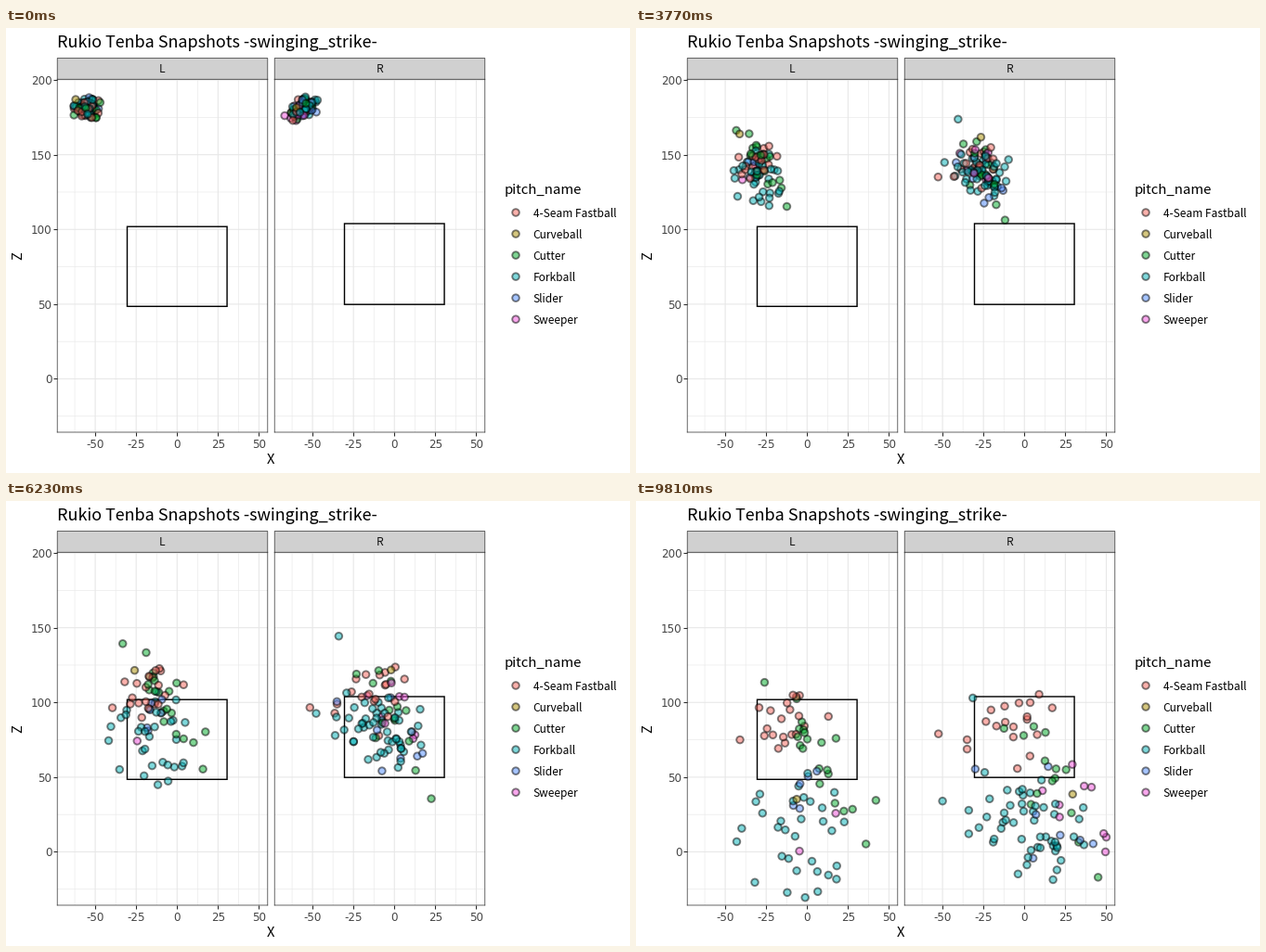
Animation, 672 px wide and 480 px high, one loop 10000 ms. Source, as a matplotlib script:

```python
import numpy as np
import matplotlib.pyplot as plt
from matplotlib.animation import FuncAnimation
from matplotlib.colors import to_rgba
from matplotlib.patches import Rectangle

W, H, DPI = 672, 480, 96
FRAMES, LOOP = 53, 10000
PX = 72 / DPI  # points per pixel
SANS, DIGITS = "Noto Sans CJK JP", "DejaVu Sans"
DARK, GRID, STRIP, TICK = "#2A2A2A", "#E7E7E7", "#D0D0D0", "#444444"
TOP, BOTTOM, WIDTH = 55.3, 436, 226.6
plt.rcParams["path.snap"] = False

# colour, flight time in steps, half acceleration (x, z),
# spread at the plate (x, z), correlation of x and z there
PITCHES = {
    "4-Seam Fastball": ("#F7645A", 39.5, (-0.0125, -0.023), (13, 16), 0.1),
    "Curveball": ("#AA8F00", 52.0, (0, -0.055), (0, 0), 0),
    "Cutter": ("#00AD28", 42.8, (0.002, -0.035), (16, 27), -0.8),
    "Forkball": ("#00B3B9", 45.2, (-0.010, -0.050), (18, 23), -0.2),
    "Slider": ("#4E8CFF", 43.8, (0, -0.040), (18, 20), -0.5),
    "Sweeper": ("#F351DD", 46.0, (0.015, -0.050), (12, 16), -0.4),
}
NAMES = list(PITCHES)

# pitch: (count, mean end point, outlying end points)
LEFT = {
    "4-Seam Fastball": (19, (-13, 87), [(-41, 75)]),
    "Curveball": (1, (-5, 28), []),
    "Cutter": (20, (6, 62), [(42, 34.5)]),
    "Forkball": (32, (-7, 16), []),
    "Slider": (5, (6, 37), []),
    "Sweeper": (2, (8, 20), []),
}
RIGHT = {
    "4-Seam Fastball": (18, (-9, 86), [(-52.5, 79)]),
    "Curveball": (1, (31.5, 32), []),
    "Cutter": (13, (19, 44), [(45, -17)]),
    "Forkball": (50, (2, 19), [(-31.5, 103), (-50, 34)]),
    "Slider": (7, (6, 30), []),
    "Sweeper": (8, (26, 38), [(49.5, 0)]),
}
rng = np.random.default_rng(34)


def cloud(n, mean, spread, corr):
    """Correlated points around a mean, cut off at two deviations."""
    a, b = rng.normal(size=(2, n)).clip(-2, 2)
    b = corr * a + np.sqrt(1 - corr**2) * b
    return np.array(mean) + np.c_[a, b] * spread


def throw(groups, tilt, sweep_shift):
    """Release, velocity, acceleration, flight time and type per pitch."""
    parts = []
    for kind, name in enumerate(NAMES):
        _, time, acc, spread, corr = PITCHES[name]
        n, mean, extra = groups[name]
        end = np.vstack([cloud(n, mean, spread, corr), *extra])
        n = len(end)
        shift = sweep_shift if name == "Sweeper" else 0
        start = cloud(n, (-55 + shift, 182 + shift), (4, 3.6), tilt)
        t = time + rng.normal(0, 0.5, (n, 1)).clip(-1, 1)
        acc = np.tile(acc, (n, 1))
        vel = (end - start - acc * t**2) / t
        parts.append((start, vel, acc, t, np.full(n, kind)))
    cols = [np.concatenate(c) for c in zip(*parts)]
    order = rng.permutation(len(cols[0]))
    return [c[order] for c in cols]


fig = plt.figure(figsize=(W / DPI, H / DPI), dpi=DPI, facecolor="white")
stage = fig.add_axes([0, 0, 1, 1])
stage.set(xlim=(0, W), ylim=(H, 0))
stage.axis("off")


def label(x, y, text, px, color="black", **kw):
    stage.text(x, y, text, fontsize=px * PX, color=color, family=SANS, **kw)


def dots(ax, xy, kinds):
    fills = [to_rgba(PITCHES[NAMES[k]][0], 0.5) for k in kinds]
    return ax.scatter(*np.transpose(xy), s=(7.58 * PX) ** 2, c=fills,
                      edgecolors=[(0, 0, 0, 0.5)], linewidths=1.89 * PX,
                      zorder=5)


def panel(x0, title, zone, data):
    ax = fig.add_axes([x0 / W, 1 - BOTTOM / H, WIDTH / W, (BOTTOM - TOP) / H])
    ax.set(xlim=(-73.2, 55.3), ylim=(-35.7, 200.5))
    ax.set_axisbelow(True)
    xs, zs = range(-50, 51, 25), range(0, 201, 50)
    ax.set_xticks(xs, [str(v) for v in xs])
    ax.set_yticks(zs, [str(v) for v in zs])
    ax.set_xticks(np.arange(-62.5, 55, 25), minor=True)
    ax.set_yticks(range(-25, 200, 50), minor=True)
    ax.grid(which="major", color=GRID, lw=1.07 * PX)
    ax.grid(which="minor", color=GRID, lw=0.6 * PX)
    ax.tick_params(which="minor", length=0)
    ax.tick_params(which="major", length=2.75, width=1.07 * PX, color=DARK,
                   labelcolor=TICK, labelsize=8.9, labelfontfamily=DIGITS)
    ax.tick_params(axis="x", pad=2.2)
    ax.tick_params(axis="y", pad=1.7)
    if title == "R":
        ax.tick_params(axis="y", length=0, labelleft=False)
    for spine in ax.spines.values():
        spine.set(color=DARK, linewidth=0.7 * PX)
    low, high = zone
    ax.add_patch(Rectangle((-30.5, low), 61, high - low, fill=False,
                           ec="black", lw=1.42 * PX, zorder=4))
    stage.add_patch(Rectangle((x0, 32.6), WIDTH, TOP - 32.6, fc=STRIP,
                              ec=DARK, lw=0.7 * PX))
    label(x0 + WIDTH / 2, 48.5, title, 12, "#141414", ha="center")
    return dots(ax, data[0], data[4])


left, right = throw(LEFT, 0, 0), throw(RIGHT, 0.45, -4)
sides = [(left, panel(55.2, "L", (48.5, 101.9), left)),
         (right, panel(289.2, "R", (49.8, 103.9), right))]

label(55, 21, "Rukio Tenba Snapshots -swinging_strike-", 18)
label(285, 470, "X", 14.7, ha="center")
label(13, 246, "Z", 14.7, ha="center", va="center", rotation=90)
label(537, 179, "pitch_name", 14.9)
keys = [(549, 199 + 23.04 * i) for i in range(len(NAMES))]
dots(stage, keys, range(len(NAMES)))
for name, (_, y) in zip(NAMES, keys):
    label(567.5, y + 4.6, name, 11.95)


def update(step):
    for (start, vel, acc, time, _), marks in sides:
        t = np.minimum(step, time)  # each ball stops at the plate
        marks.set_offsets(start + vel * t + acc * t**2)
    return [marks for _, marks in sides]


anim = FuncAnimation(fig, update, frames=FRAMES, interval=LOOP / FRAMES,
                     repeat=True, repeat_delay=0)
plt.show()
```
